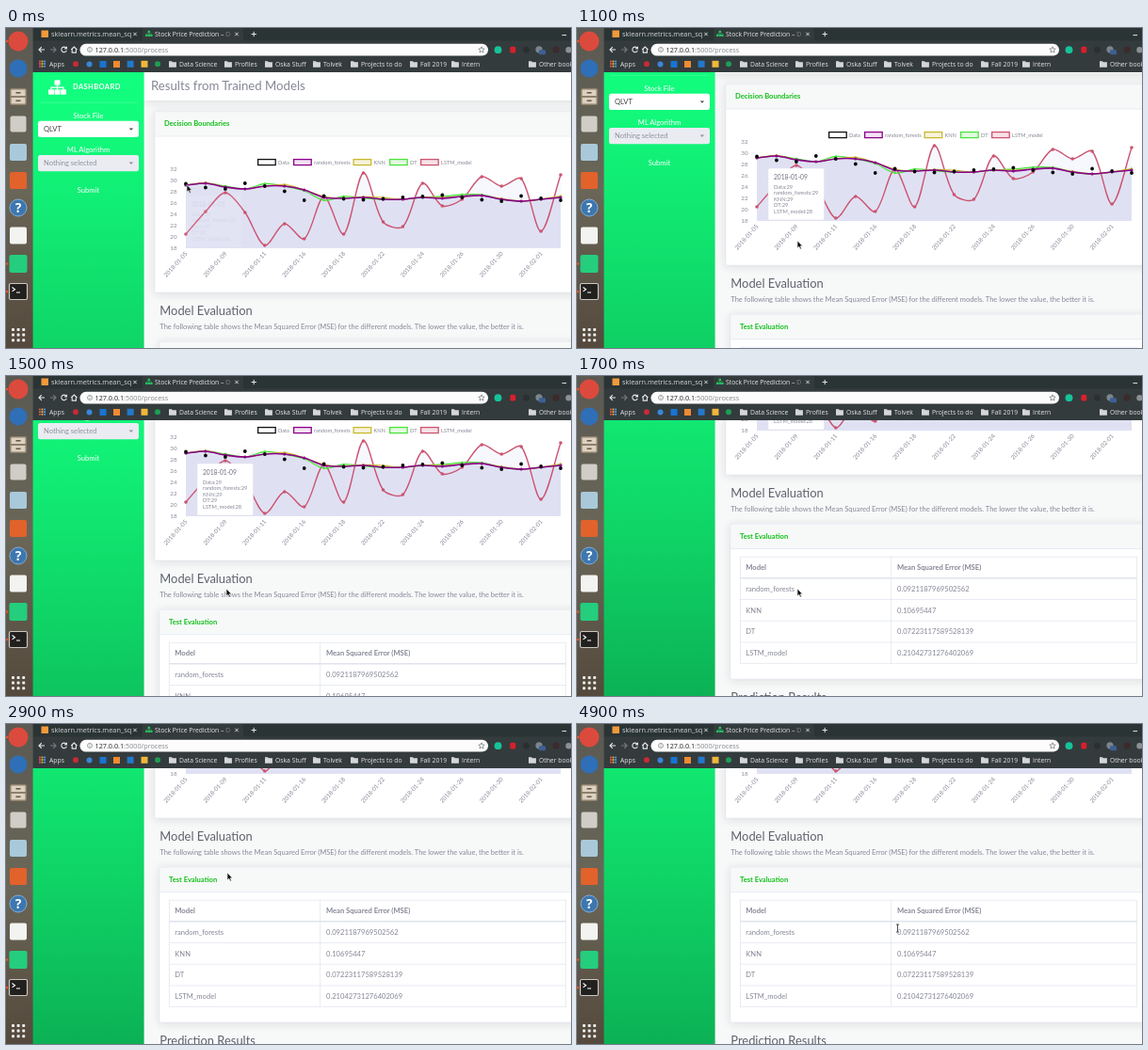
Recreate the animation shown at these times as an HTML page. Size 600 by 340 pixels, loop 5000 ms.

```html
<!DOCTYPE html>
<html lang="en">
<head>
<meta charset="utf-8">
<title>Stock Price Prediction</title>
<style>
html, body { margin: 0; width: 100%; height: 100%; overflow: hidden; background: #f7f9f9; }
svg { display: block; width: 600px; height: 340px; }
text { font-family: Lato, sans-serif; font-size: 7.6px; fill: #858796; white-space: pre; }
.ui text { font-family: "Open Sans", "Noto Sans", sans-serif; }
</style>
</head>
<body>
<svg id="stage" viewBox="0 0 600 340" xmlns="http://www.w3.org/2000/svg"></svg>
<script>
const LOOP = 5000, STEP = 100;

// ---- drawing helpers ----
const rect = (x, y, w, h, fill, more = '') =>
  `<rect x="${x}" y="${y}" width="${w}" height="${h}" fill="${fill}" ${more}/>`;
const dot = (x, y, r, fill, more = '') =>
  `<circle cx="${x}" cy="${y}" r="${r}" fill="${fill}" ${more}/>`;
const path = (d, stroke, width = 1, more = '') =>
  `<path d="${d}" fill="none" stroke="${stroke}" stroke-width="${width}" ${more}/>`;
const text = (x, y, str, css = '', more = '') =>
  `<text x="${x}" y="${y}" style="${css}" ${more}>${str}</text>`;
const size = (px, fill) => `font-size:${px}px;` + (fill ? `fill:${fill}` : '');
const MID = 'text-anchor="middle"';

function sitemap(x, y, k, color) {
  const boxes = [[6.5, 0], [0, 10], [6.5, 10], [13, 10]]
    .map(([a, b]) => rect(a, b, 6, 5.5, color, 'rx=".8"')).join('');
  return `<g transform="translate(${x} ${y}) scale(${k})">${boxes}` +
    path('M9.5 5V10M3 10V7.8H16V10', color, 1.2) + '</g>';
}

// ---- chart ----
const X0 = 191, DX = 20.95, BASE = 233.9;
const forest = [167, 165, 169, 171, 168, 168, 172, 180, 181, 180, 182, 182, 180, 181, 179, 178, 182, 184, 182, 180];
const lstm = [219, 195, 175, 196, 231, 208, 224, 179, 219, 154, 206, 211, 165, 189, 182, 158, 168, 160, 216, 156];
const actual = [165.5, 169.5, 171, 165, 168, 173.5, 183, 178.5, 181.5, 182.5, 181.5, 180, 179, 177.5, 180, 182.5, 184, 178.5, 181, 183];
const shift = (list, moves) => list.map((v, i) => v + (moves[i] || 0));
const knn = shift(forest, { 1: -.6, 5: -1.6, 7: -1, 9: -.6, 10: -1.8, 13: -1, 16: -.6, 19: -1.5 });
const tree = shift(forest, { 2: -1, 4: -2.5, 6: 1, 7: 3, 8: -2, 9: .6, 13: -2, 14: -2, 15: -.8, 19: -.8 });
const toPoints = list => list.map((y, i) => [X0 + DX * i, y]);

function spline(list, tension = .3) {
  const p = toPoints(list);
  const dist = (a, b) => Math.hypot(a[0] - b[0], a[1] - b[1]);
  const handles = p.map((q, i) => {
    const a = p[i - 1] || q, b = p[i + 1] || q;
    const da = dist(a, q), db = dist(q, b), k = tension / (da + db);
    const at = s => [q[0] + s * (b[0] - a[0]), q[1] + s * (b[1] - a[1])];
    return { before: at(-k * da), after: at(k * db) };
  });
  return p.reduce((d, q, i) => i
    ? d + `C${handles[i - 1].after} ${handles[i].before} ${q}`
    : `M${q}`, '');
}

function series(list, color, width, r) {
  return path(spline(list), color, width) +
    toPoints(list).map(([x, y]) => dot(x.toFixed(1), y, r, color)).join('');
}

function chart() {
  const close = `L${X0 + DX * 19} ${BASE}L${X0} ${BASE}Z`;
  let s = `<path d="${spline(lstm)}${close}" fill="#4e73df" opacity=".05"/>` +
    `<path d="${spline(forest)}${close}" fill="#dfe1f3"/>`;
  for (let v = 18; v <= 32; v += 2)
    s += text(181.5, BASE + 2 - (v - 18) * 5.97, v, size(6.2), 'text-anchor="end"');
  '01-05 01-09 01-11 01-16 01-18 01-22 01-24 01-26 01-30 02-01'.split(' ').forEach((day, i) => {
    const x = X0 + DX * 2 * i;
    s += text(0, 0, '2018-' + day, size(6.3), `text-anchor="end" transform="translate(${x + 2} 240) rotate(-48)"`);
  });
  [['Data', 267, '#111', '#fff'], ['random_forests', 305, '#8b008b', '#f3e3f4'], ['KNN', 368.5, '#c9b82c', '#f6f3dc'],
   ['DT', 407, '#4be43c', '#e4fae2'], ['LSTM_model', 440, '#cc5470', '#f7e2e7']].forEach(([name, x, color, fill]) => {
    s += rect(x + .6, 139.6, 18.6, 6, fill, `stroke="${color}" stroke-width="1.3"`) +
      text(x + 22, 144.6, name, size(5.7));
  });
  s += series(lstm, '#cc5470', 1.4, 1.8) + series(tree, '#4be43c', 1.3, 1.2) +
    series(knn, '#c9b82c', 1.2, 1.2) + series(forest, '#8b008b', 1.6, 1.6);
  return s + toPoints(actual).map(([x, y]) => dot(x.toFixed(1), y, 1.9, '#0a0a0a')).join('');
}

function tooltip() {
  let s = rect(0, 178, 59.5, 55, '#fff', 'rx="1.5" stroke="#dddfeb" stroke-width=".5"') +
    text(6, 189.6, '', size(6.67, '#6e707e'), 'id="tipDay"');
  ['Data:29', 'random_forests:29', 'KNN:29', 'DT:29', ''].forEach((line, i) => {
    s += text(6, 199.6 + 6.5 * i, line, size(5.76), i === 4 ? 'id="tipLast"' : '');
  });
  return `<g id="tip">${s}</g>`;
}

// ---- page ----
function card(x, top, bottom, title, dx) {
  return rect(x, top, 460, bottom - top, '#fff', 'rx="2.5" filter="url(#soft)"') +
    rect(x, top, 460, 26, '#f7f9f9', 'rx="2.5"') +
    path(`M${x} ${top + 26}h460`, '#e3e6f0', .7) +
    path(`M${x} ${top}h460V${bottom}h-460Z`, '#e3e6f0', .5) +
    text(x + dx, top + 15.4, title, 'font-weight:700;fill:#12be18');
}

function table() {
  const rows = [['random_forests', '0.0921187969502562'], ['KNN', '0.10695447'],
    ['DT', '0.07223117589528139'], ['LSTM_model', '0.21042731276402069']];
  let s = path('M173.4 368V481.4M333.6 368V481.4M594.4 368V481.4', '#e3e6f0', .8) +
    path('M173 368.2H594.8M173 413.5H594.8M173 436.2H594.8M173 458.9H594.8M173 481.4H594.8', '#e3e6f0', .8) +
    path('M173 390.7H594.8', '#e0e3ee', 1.4);
  const bold = 'font-weight:700';
  s += text(179.3, 381.8, 'Model', bold) + text(340, 381.8, 'Mean Squared Error (MSE)', bold);
  rows.forEach(([name, mse], i) => {
    const y = 404.9 + 22.65 * i;
    s += text(179.3, y, name) + text(340, y, mse);
  });
  return s;
}

function sidebar() {
  const white = 'fill:#fff';
  const select = (y, fill, label, color) => rect(34, y, 107, 17.3, fill, 'rx="2.4"') +
    text(40, y + 11.2, label, `fill:${color}`) + `<path d="M130.7 ${y + 7.6}h4.4l-2.2 2.4z" fill="${color}"/>`;
  return rect(28, 47, 118.6, 500, 'url(#green)') + sitemap(45, 55.3, 1, '#fff') +
    text(71, 65.4, 'DASHBOARD', 'font-size:7.5px;font-weight:700;letter-spacing:.4px;fill:#fff') +
    path('M36 79.2H140', '#fff', .5, 'opacity=".35"') +
    text(87.5, 96, 'Stock File', white, MID) + select(98.8, '#fff', 'QLVT', '#444') +
    text(87.5, 132, 'ML Algorithm', white, MID) + select(135, '#eaecf2', 'Nothing selected', '#8f929c') +
    text(87.5, 174.8, 'Submit', white, MID);
}

function page() {
  const heading = size(12.9, '#5f616d');
  return rect(146, 47, 454, 500, '#f7f9f9') +
    rect(146, 30, 461, 47, '#fff', 'filter="url(#soft)"') +
    text(154, 66, 'Results from Trained Models', size(13.2)) +
    card(158, 89, 281, 'Decision Boundaries', 10) + chart() + tooltip() +
    text(163.3, 304.7, 'Model Evaluation', heading) +
    text(163.3, 319.6, 'The following table shows the Mean Squared Error (MSE) for the different models. ' +
      'The lower the value, the better it is.', size(7.5)) +
    card(163, 333.5, 498, 'Test Evaluation', 10) + table() +
    text(163.3, 522, 'Prediction Results', heading) + sidebar();
}

// ---- browser frame ----
function browser() {
  const light = '#e6e7e9', grey = '#85898c', bar = '#343b3d';
  const cross = (x, y) => path(`M${x - 1.7} ${y - 1.7}l3.4 3.4m0-3.4l-3.4 3.4`, light, .9);
  let s = rect(28, 0, 572, 14, '#2b3435') + rect(28, 13.5, 572, 33.5, bar) +
    `<path d="M143 14q2 0 2-2V2q0-2 2-2H250q2 0 2 2V12q0 2 2 2Z" fill="${bar}"/>` +
    rect(37.5, 2.5, 7.5, 7.5, '#f09a3a') + text(48, 9.3, 'sklearn.metrics.mean_sq', size(7.37, '#d3d5d8')) + cross(137, 6.5) +
    sitemap(148, 2.8, .4, '#22c55e') + text(158, 9.3, 'Stock Price Prediction – D', size(6.8, light)) +
    rect(234, 1, 5, 11, bar, 'opacity=".6"') + cross(245, 6.5) +
    path('M260.6 6.5h5.2M263.2 3.9v5.2M590.5 7.6h4.6', light, 1);
  s += path('M41 23h-6M37.8 20.2l-2.8 2.8l2.8 2.8', light, 1.1) +
    path('M47 23h6M50.2 20.2l2.8 2.8l-2.8 2.8', '#777b80', 1.1) +
    path('M64 21.4a2.8 2.8 0 1 0 .3 2.4M64.4 19.8v2.1h-2.2', light, 1.1) +
    path('M69.2 23l3.1-3l3.1 3M70.2 22.6v3.5h4.2v-3.5', light, 1.1) +
    rect(78.5, 16.8, 433.5, 12.8, '#fcfcfc', 'rx="6.4"') + dot(89, 23, 2.5, 'none', `stroke="${grey}" stroke-width=".8"`) +
    path('M89 22.7v1.7M89 21.2v.7', grey, .8) +
    text(94.5, 25.6, `127.0.0.1<tspan fill="${grey}">:5000/process</tspan>`, size(7.24, '#222')) +
    path('M505 19.8l.9 2.2l2.3.2l-1.7 1.5l.5 2.3l-2-1.2l-2 1.2l.5-2.3l-1.7-1.5l2.3-.2z', '#6a6e72', .7) +
    dot(522.5, 23.2, 3.9, '#15c39a') + rect(535.4, 19.8, 5.8, 6.6, '#d8202c', 'rx="1.5"') +
    dot(552.5, 23.2, 3.4, '#2a3032') + dot(566, 22.8, 3.6, '#7b858d') + rect(566, 23.2, 7, 5, '#3c5f94', 'rx="1"') +
    dot(584, 23.2, 3.6, '#3c2a2d') + dot(597.5, 23.2, 3.2, '#8b9093');
  for (let i = 0; i < 9; i++)
    s += rect(35 + 2.6 * (i % 3), 34.6 + 2.6 * Math.floor(i / 3), 1.8, 1.8, ['#e4574c', '#f0b93a', '#4b9cf0'][i % 3]);
  s += text(46, 40.6, 'Apps', size(6.8, light)) + dot(74, 38.3, 3, '#c62b36') + dot(88.5, 38.6, 3, '#3a86d8') +
    rect(99.5, 35, 7, 7, '#1874d0') + rect(114, 35, 7, 7, '#f08a32') + rect(128.6, 34.8, 7, 7, '#2378c8') +
    rect(143.5, 34.8, 7, 7, '#f0b73a') + dot(161, 38.3, 3, '#1f9d55');
  [['Data Science', 173], ['Profiles', 232], ['Oska Stuff', 275], ['Tolvek', 326], ['Projects to do', 366],
   ['Fall 2019', 429], ['Intern', 473], ['Other book', 555]].forEach(([name, x]) => {
    s += `<path d="M${x} 35.2h2.9l1 1.1h4v5.4h-7.9z" fill="#d4d6d9"/>` + text(x + 11, 40.7, name, size(6.8, light));
  });
  return `<g class="ui">${s}</g>`;
}

function dock() {
  const tile = (y, fill, w = 20) => rect(13 - w / 2, y - w / 2, w, w, fill, 'rx="2"');
  let s = rect(0, 0, 28.6, 340, 'url(#dockFill)') +
    dot(13, 14, 10.5, '#dc4a3d') + dot(13, 43, 9.5, '#2f6fb7') +
    tile(73, '#8f7f69', 18) + rect(5.5, 65.5, 15, 6.5, '#dcd2c1') + rect(5.5, 74, 15, 6.5, '#dcd2c1') +
    rect(10.5, 68, 5, 1.6, '#6b5a45') + rect(10.5, 76.5, 5, 1.6, '#6b5a45') +
    tile(102, '#cfcdc6', 17) + tile(132, '#a9c9da', 18) + tile(162, '#e2622b', 18) +
    dot(13, 191, 9, '#3d77b0', 'stroke="#86acd3"') +
    text(13, 196.2, '?', 'font-size:14px;font-weight:700;fill:#fff', MID) +
    tile(220.5, '#f3f3f1', 18) + tile(250.5, '#24ce7d', 19) +
    rect(3.5, 271.5, 19, 17, '#23211f', 'rx="1.5" stroke="#c9c7c2" stroke-width="1.2"') +
    path('M6.5 275.5l3 2.2l-3 2.2M11 281h4', '#fff', 1.1);
  [14, 250.5, 280].forEach(y => s += dot(1, y, 1.3, '#e95420'));
  for (let i = 0; i < 9; i++)
    s += rect(6 + 5.6 * (i % 3), 319 + 5.6 * Math.floor(i / 3), 3, 3, '#eee', 'rx=".8"');
  return `<g class="ui">${s}</g>`;
}

const stop = (at, color) => `<stop offset="${at}" stop-color="${color}"/>`;
const fade = (id, y1, y2, stops) =>
  `<linearGradient id="${id}" gradientUnits="userSpaceOnUse" x1="0" x2="0" y1="${y1}" y2="${y2}">${stops}</linearGradient>`;

document.getElementById('stage').innerHTML = '<defs>' +
  fade('green', 47, 547, stop(0, '#12ff80') + stop(.12, '#12fa7c') + stop(.59, '#0fd466') + stop(1, '#0bac52')) +
  fade('dockFill', 0, 340, stop(0, '#5a5952') + stop(.5, '#6a6758') + stop(1, '#54493c')) +
  '<filter id="soft" x="-10%" y="-20%" width="120%" height="150%">' +
  '<feDropShadow dx="0" dy="1.2" stdDeviation="4.5" flood-color="#3a3b45" flood-opacity=".17"/></filter>' +
  '<clipPath id="view"><rect x="28" y="47" width="572" height="293"/></clipPath></defs>' +
  `<g clip-path="url(#view)"><g id="page">${page()}</g></g>` + browser() + dock() +
  '<path id="arrow" d="M0 0V7.8L1.8 6.2L3 9L4.4 8.4L3.2 5.7H5.5Z" fill="#111" stroke="#fff" stroke-width=".6"/>' +
  `<g id="beam">${path('M-1.6 -4H1.6M0 -4V4M-1.6 4H1.6', '#fff', 1.8)}${path('M-1.6 -4H1.6M0 -4V4M-1.6 4H1.6', '#222', .8)}</g>`;

// ---- motion ----
const el = id => document.getElementById(id);
const parts = Object.fromEntries(['page', 'tip', 'tipDay', 'tipLast', 'arrow', 'beam'].map(id => [id, el(id)]));

// Linear interpolation over keys of the form [time, a, b, ...]
function track(keys, t) {
  const i = keys.findIndex(k => k[0] > t);
  if (i < 0) return keys[keys.length - 1].slice(1);
  if (i === 0) return keys[0].slice(1);
  const a = keys[i - 1], b = keys[i], u = (t - a[0]) / (b[0] - a[0]);
  return a.slice(1).map((v, n) => v + (b[n + 1] - v) * u);
}

const scroll = [[900, 0], [1000, 8], [1100, 29], [1300, 47], [1400, 62], [1500, 85], [1700, 176], [1900, 176], [2000, 181]];
const pointer = [[0, 192, 166.5], [200, 194, 172], [600, 234, 226], [2200, 234, 226], [2700, 235, 158], [3000, 235, 158],
  [3100, 300, 150], [3200, 400, 195], [3300, 349, 200], [3500, 349, 200], [3900, 347, 191.5], [4000, 347, 191.5],
  [4200, 351, 218], [4400, 347, 240], [4600, 347, 230], [4900, 340.5, 217]];
const tipPlace = [[300, 191], [400, 198], [500, 203]];
const tipAlpha = [[0, .1], [100, .6], [200, 1], [1900, 1], [2000, 0]];

function draw(time) {
  const t = Math.floor((time % LOOP) / STEP) * STEP;
  const [x, y] = track(pointer, t), typing = t >= 4200;
  parts.page.setAttribute('transform', `translate(0 ${-track(scroll, t)[0]})`);
  parts.tip.setAttribute('transform', `translate(${track(tipPlace, t)[0]} 0)`);
  parts.tip.setAttribute('opacity', track(tipAlpha, t)[0]);
  parts.tipDay.textContent = t < 400 ? '2018-01-05' : '2018-01-09';
  parts.tipLast.textContent = 'LSTM_model:' + (t < 400 ? 20 : 28);
  for (const [node, on] of [[parts.arrow, !typing], [parts.beam, typing]]) {
    node.setAttribute('transform', `translate(${x} ${y})`);
    node.setAttribute('visibility', on ? 'visible' : 'hidden');
  }
}

const start = performance.now();
function tick(now) {
  draw(Math.max(0, now - start));
  requestAnimationFrame(tick);
}
draw(0);
requestAnimationFrame(tick);
</script>
</body>
</html>
```
